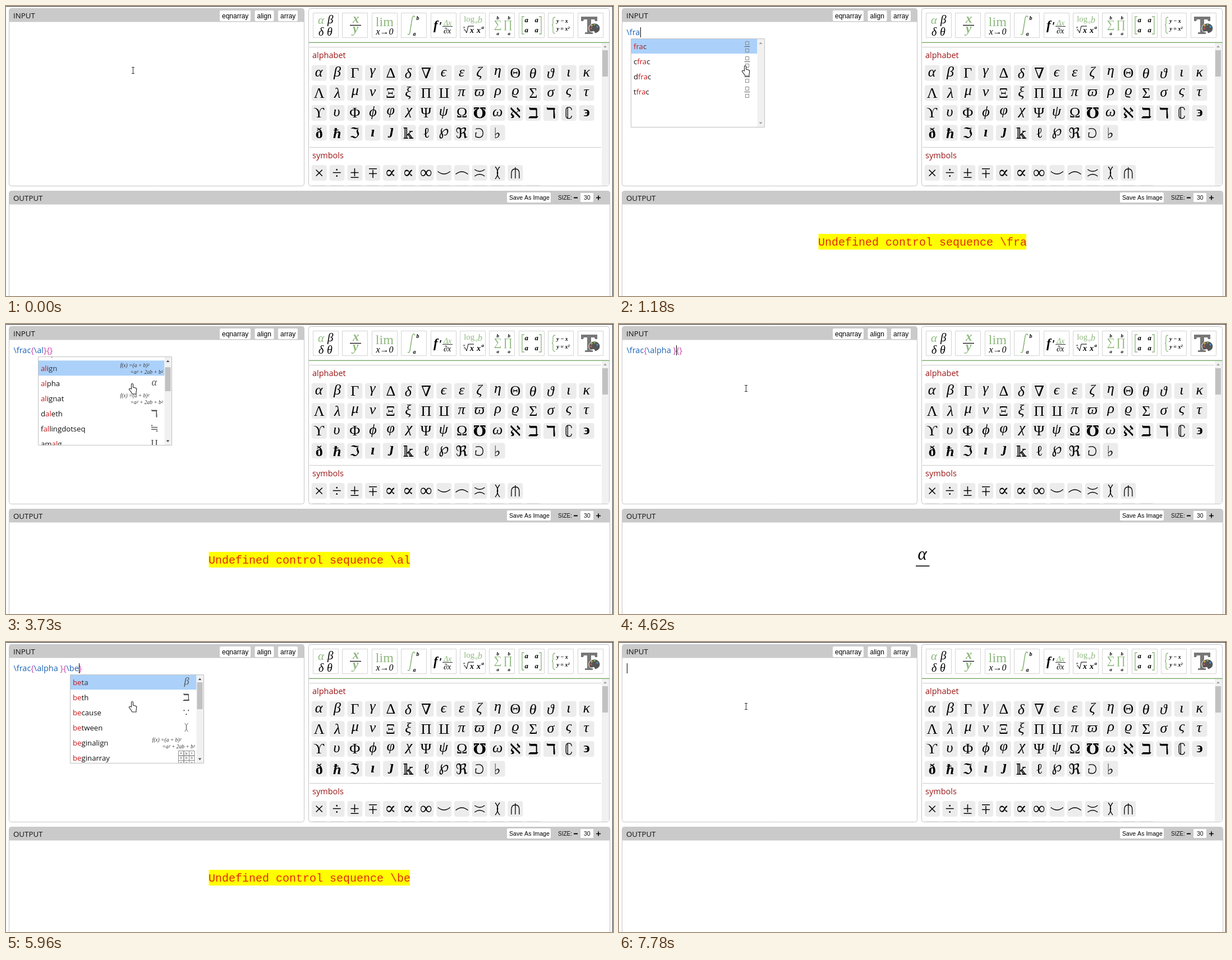
An HTML page with a canvas that plays this animation: 1082x518 px, repeating every 8 s.

```html
<!DOCTYPE html>
<html lang="en">
<head>
<meta charset="utf-8">
<title>Equation editor</title>
<style>
  html, body { margin: 0; width: 100%; height: 100%; overflow: hidden; background: #fff; }
  canvas { position: absolute; left: 0; top: 0; }
</style>
</head>
<body>
<canvas id="page" width="1082" height="518"></canvas>
<canvas id="live" width="1082" height="518"></canvas>
<script>
const LOOP = 8000;
const UI = '"Open Sans", sans-serif';
const ARIAL = '"Liberation Sans", Arial, sans-serif';
const MATH = '"Liberation Serif", "DejaVu Serif", "DejaVu Sans", serif';
const GREEN = '#8fb87f';
let g = document.getElementById('page').getContext('2d');

function box(x, y, w, h, fill, stroke, radius = 0) {
  g.beginPath();
  g.roundRect(x, y, w, h, radius);
  if (fill) { g.fillStyle = fill; g.fill(); }
  if (stroke) { g.strokeStyle = stroke; g.lineWidth = 1; g.stroke(); }
}
function path(d, stroke, width = 1, fill) {
  const p = new Path2D(d);
  if (fill) { g.fillStyle = fill; g.fill(p); }
  if (stroke) { g.strokeStyle = stroke; g.lineWidth = width; g.stroke(p); }
}
function text(s, x, y, font, color = '#111') {
  g.font = font;
  g.fillStyle = color;
  g.fillText(s, x, y);
  return x + g.measureText(s).width;
}

// Thin symbols drawn as strokes, and symbols that are another one upside down
const STROKES = {
  '⌣': 'M-11-2.5q11 9 22 0', '⌢': 'M-11 2.5q11-9 22 0',
  '≍': 'M-9-6q9 7 18 0M-9 6q9-7 18 0',
  '≬': 'M-4-11q9 11 0 22M4-11q-9 11 0 22',
  '⋔': 'M0-10v20M-7 10v-9q0-8 7-8t7 8v9',
  '⅁': 'M-5 0h-2v7q12 4 13-6 0-11-13-8',
  '∁': 'M5-5q0-5-5-5t-5 5v10q0 5 5 5t5-5M-2-9v18'
};
const FLIPPED = { '∐': 'Π', '∓': '±' };

// Math text with its ink centred on (x, y)
function glyph(s, x, y, size, color = '#000', style = '') {
  g.save();
  g.translate(x, y);
  if (FLIPPED[s]) g.rotate(Math.PI);
  if (STROKES[s]) {
    g.scale(size / 26, size / 26);
    path(STROKES[s], color, 1.3);
  } else {
    g.font = `${style} ${size}px ${MATH}`;
    g.fillStyle = color;
    const shown = FLIPPED[s] || s, m = g.measureText(shown);
    g.fillText(shown, (m.actualBoundingBoxLeft - m.actualBoundingBoxRight) / 2,
      (m.actualBoundingBoxAscent - m.actualBoundingBoxDescent) / 2);
  }
  g.restore();
}
const italic = (s, x, y, size, color) => glyph(s, x, y, size, color, 'italic');
const boldItalic = (s, x, y, size, color) => glyph(s, x, y, size, color, 'italic bold');
const styleOf = c => /[ıȷħ]/.test(c) ? 'italic bold' : /[α-ωϕϑϖϱϵ]/.test(c) ? 'italic'
  : /[℧ℶℸ϶ð]/.test(c) ? 'bold' : '';

function panel(x, y, w, h, title) {
  box(x + .5, y + .5, w, h, '#fff', '#c6c6c6', 4);
  if (!title) return;
  box(x + .5, y + .5, w, 24, '#cacaca', null, [4, 4, 0, 0]);
  text(title, 13, y + 17.5, `13.3px ${UI}`);
}
function button(label, x, y, w, h, size) {
  box(x, y, w, h, '#fff', null, 2);
  text(label, x + 4, y + h / 2 + size * .35, `${size}px ${ARIAL}`, '#000');
}
function symbolRow(symbols, y, size = 26) {
  [...symbols].forEach((c, i) => {
    const x = 558.3 + i * 31.78;
    box(x - 13.5, y - 14, 27, 28, '#ececec', null, 4);
    if (c !== ' ') glyph(c, x, y, STROKES[c] ? 26 : size, '#000', styleOf(c));
  });
}

function drawToolbar() {
  for (let i = 0; i < 10; i++) box(547.5 + Math.round(i * 52.4), 12.5, 45, 44, '#fff', '#d4d4d4');
  italic('α', 562, 27, 21, GREEN); italic('β', 578, 26, 21);
  italic('δ', 562, 45, 20); italic('θ', 577, 45, 20);
  boldItalic('x', 623, 24, 23, GREEN);
  path('M613 34.5h20', '#222', 1.5);
  boldItalic('y', 622, 45, 23, GREEN);
  glyph('lim', 675, 28, 24, GREEN);
  italic('x→0', 674.5, 45, 16);
  path('M729 20q-3-5-5 2l-4 25q-1 6-4 3', GREEN, 1.6);
  boldItalic('b', 734, 21, 10); boldItalic('a', 728, 50, 10);
  boldItalic('f', 767, 36, 23); glyph('′', 775, 31, 20, '#000', 'bold');
  italic('Δx', 787, 30, 14, GREEN); path('M778 36.5h18', '#333'); italic('∂x', 787, 43, 14);
  glyph('log', 826, 24, 15, GREEN); italic('a', 839, 29, 9, GREEN); italic('b', 845, 24, 16, GREEN);
  path('M816 43l2-1 3 6 3-12h10', '#000'); italic('n', 817, 38, 7);
  boldItalic('x', 830, 44, 14); boldItalic('x', 842, 44, 14); boldItalic('a', 850, 39, 9);
  glyph('∑', 876, 35, 20, GREEN); glyph('∏', 895, 35, 20, GREEN);
  for (const x of [877, 897]) {
    boldItalic('b', x, 21, 9);
    boldItalic('a', x, 50, 9);
  }
  path('M924 19h-4v31h4M950 19h4v31h-4', GREEN, 1.4);
  for (const x of [928, 946]) for (const y of [26, 44]) boldItalic('a', x, y, 13);
  path('M979 20q-4 0-4 4v6q0 4-2 4 2 0 2 4v7q0 4 4 4', GREEN, 1.3);
  boldItalic('y − x', 991, 28, 10); boldItalic('y = x²', 993, 41, 10);
  path('M1025 19h29v8h-4l-1-3h-6v23h3v3h-14v-3h4v-23h-6l-1 3h-4z', null, 0, '#777');
  path('M1039 41a10 9 0 1 1 14 7q-4 2-4-1t-4-1q-5 1-6-5z', '#fff', 1, '#555');
  [['#d8a23c', 1044, 35], ['#65b35d', 1049, 33], ['#4f90d0', 1054, 37], ['#c8584c', 1043, 40]]
    .forEach(([color, x, y]) => box(x - 1.7, y - 1.7, 3.4, 3.4, color, null, 2));
  box(540, 64.5, 535.5, 1.5, '#7fb070');
}

function drawPage() {
  box(0, 0, 1082, 518, '#fff');
  box(0, 0, 1082, 1, '#222');
  box(1081, 0, 1, 518, '#333');
  panel(5, 4, 526, 317, 'INPUT');
  button('eqnarray', 381, 8, 55, 19, 12);
  button('align', 443.5, 8, 34, 19, 12);
  button('array', 485, 8, 35, 19, 12);

  panel(539, 4, 536, 317);
  drawToolbar();
  path('M541 73.5h520M541 252.5h520', '#ccc');
  text('alphabet', 546, 93, `14.5px ${UI}`, '#9b1515');
  text('symbols', 546, 271.5, `14.5px ${UI}`, '#9b1515');
  ['αβΓγΔδ∇ϵεζηΘθϑικ', 'ΛλμνΞξΠ∐πϖρϱΣσςτ', 'ϒυΦϕφχΨψΩ℧ωℵℶℸ∁϶', 'ðħℑıȷ𝕜ℓ℘ℜ⅁♭']
    .forEach((row, i) => symbolRow(row, 119.5 + i * 35.7));
  symbolRow('×÷±∓∝∝∞⌣⌢≍≬⋔', 298, 30);
  g.save();
  g.beginPath(); g.rect(541, 310, 520, 11); g.clip();
  symbolRow(' '.repeat(13), 333.5);
  g.restore();
  box(1062, 66, 13, 255, '#f1f1f1');
  box(1063, 79, 10, 47, '#c1c1c1');
  path('M1065 74h6l-3-3.5z', null, 0, '#a0a0a0');

  panel(5, 330, 1071, 200, 'OUTPUT');
  button('Save As Image', 893, 333, 78, 18, 10.6);
  text('SIZE:', 984, 346, `10px ${ARIAL}`);
  box(1012, 341.5, 7, 2, '#000');
  box(1024, 334, 23, 16, '#fff');
  text('30', 1030, 346, `10.5px ${ARIAL}`);
  path('M1052 342.5h8M1056 338.5v8', '#000', 1.6);
}

// Suggestion lists by typed prefix: left edge, total rows, names
const FRAC = ['frac', 'cfrac', 'dfrac', 'tfrac'];
const AL = ['aleph', 'align', 'alpha', 'alignat', 'daleth', 'fallingdotseq', 'amalg', 'forall'];
const BE = ['beta', 'beth', 'because', 'between', 'beginalign', 'beginarray'];
const LISTS = {
  f: [21.5, 16, ['frac', 'flat', 'frown', 'forall', 'fallingdotseq', 'cfrac']],
  fr: [21.5, 5, ['frac', 'frown', ...FRAC.slice(1)]],
  fra: [21.5, 4, FRAC],
  a: [57.5, 30, AL], al: [57.5, 18, AL],
  b: [114.5, 24, BE], be: [114.5, 16, BE]
};
const ICONS = {
  aleph: 'ℵ', alpha: 'α', daleth: 'ℸ', fallingdotseq: '≒', amalg: '∐', forall: '∀',
  flat: '♭', frown: '⌢', beta: 'β', beth: 'ℶ', because: '∵', between: '≬'
};

function drawIcon(name, right, y) {
  const gray = '#555', x = right - 31;
  if (ICONS[name]) glyph(ICONS[name], x, y, 18, gray, styleOf(ICONS[name]));
  else if (name.endsWith('frac')) {
    const mid = Math.round(y) + .5;
    path(`M${x - 5} ${mid}h10`, gray);
    box(x - 3, mid - 9, 6, 6, null, '#888');
    box(x - 3, mid + 4, 6, 6, null, '#888');
  } else if (name.includes('align')) {
    const font = `italic 9.5px ${MATH}`;
    text('f(x) =(a + b)²', right - 92, y - 2, font, '#333');
    text('=a² + 2ab + b²', right - 74, y + 10, font, '#333');
  } else {
    for (let r = 0; r < 3; r++) for (let c = 0; c < 3; c++) {
      const cx = right - 45 + c * 9.5, cy = y - 12 + r * 8.5;
      box(cx, cy, 9.5, 8.5, null, '#888');
      glyph(r ? '0' : 'abc'[c], cx + 4.7, cy + 4.3, 7, '#333');
    }
  }
}

function drawPopup(query, selected, scroll) {
  const [x, rows, names] = LISTS[query], right = x + 238, bar = right - 13;
  const scrolls = rows > 5;
  g.save();
  box(x, 58.5, 238, 158, '#fff');
  g.beginPath(); g.rect(x, 58.5, 238, 158); g.clip();
  names.forEach((name, i) => {
    const y = 71.5 + i * 27 - scroll, at = name.indexOf(query), font = `13.2px ${UI}`;
    if (i === selected) box(x, y - 13.5, 225, 27, '#abd1fa');
    const ink = i === selected ? '#334' : '#111';
    let pen = text(name.slice(0, at), x + 4.5, y + 5, font, ink);
    pen = text(query, pen, y + 5, font, '#cf1515');
    text(name.slice(at + query.length), pen, y + 5, font, ink);
    drawIcon(name, right, y);
  });
  box(bar, 59, 13, 157, '#f1f1f1');
  const total = rows * 27, arrow = scrolls ? '#505050' : '#a3a3a3';
  if (scrolls) box(bar + 1, 72 + scroll * 131 / total, 10, 131 * 158 / total, '#c1c1c1');
  path(`M${bar + 3} 68h6l-3-3.5zM${bar + 3} 207.5h6l-3 3.5z`, null, 0, arrow);
  g.restore();
  box(x, 58.5, 238, 158, null, '#c0c0c0');
}

// Start time, source text with | as the caret, prefix being completed
const STEPS = [
  [0, ''],
  [360, String.raw`\|`],
  [560, String.raw`\f|`, 'f'],
  [780, String.raw`\fr|`, 'fr'],
  [1000, String.raw`\fra|`, 'fra'],
  [1500, String.raw`\frac{|}{}`],
  [2110, String.raw`\frac{}{}`],
  [2390, String.raw`\frac{\|}{}`],
  [2840, String.raw`\frac{\a|}{}`, 'a'],
  [3080, String.raw`\frac{\al|}{}`, 'al'],
  [3570, String.raw`\frac{\al}{}`, 'al'],
  [4090, String.raw`\frac{\alpha |}{}`],
  [4620, String.raw`\frac{\alpha }|{}`],
  [4780, String.raw`\frac{\alpha }{|}`],
  [5190, String.raw`\frac{\alpha }{\|}`],
  [5680, String.raw`\frac{\alpha }{\b|}`, 'b'],
  [5900, String.raw`\frac{\alpha }{\be|}`, 'be'],
  [6360, String.raw`\frac{\alpha }{\beta |}`],
  [7050, String.raw`\frac{\alpha }{\beta }`],
  [7780, '|']
];

function drawInput(source, selectAll) {
  const font = `14.5px ${UI}`, code = source.replace('|', ''), caret = source.indexOf('|');
  if (selectAll) box(13.5, 36.5, 144, 21, '#d7d4f0');
  let pen = 13.5;
  for (const part of code.match(/[{}]|[^{}]+/g) || [])
    pen = text(part, pen, 52, font, /[{}]/.test(part) ? '#cc3fa9' : '#1c63b7');
  if (caret < 0) return;
  g.font = font;
  box(Math.round(14 + g.measureText(code.slice(0, caret)).width), 38, 1, 18, '#000');
}

function drawOutput(code, query) {
  if (query) {
    const message = 'Undefined control sequence \\' + query, width = message.length * 12;
    box(541.5 - width / 2, 407, width - 1.5, 28, '#ff0');
    text(message, 541 - width / 2, 428, '20px "Liberation Mono", monospace', '#e02a0a');
  } else if (code.includes('\\}')) {
    text(`$$${code} $$`, 6, 404, `24px ${UI}`, '#000');
  } else if (code.includes('alpha')) {
    italic('α', 541, 413, 31);
    box(529, 431.5, 24.5, 1.6, '#000');
    if (code.includes('beta')) italic('β', 541, 452, 31);
  } else if (code.includes('frac')) {
    box(538, 418.5, 6, 1.6, '#000');
  }
}

function drawPointer(hand) {
  if (hand) path('M223.5 116V108a1.5 1.5 0 0 1 3 0V113l4 1q2.5 .7 2.3 3l-.8 5v3h-7l-1-2-4.5-6q-.3-2 1.5-1.8z',
    '#222', 1.1, '#fff');
  else path('M224 109.5h5M226.5 109.5v11M224 120.5h5', '#333');
}

function frame(now) {
  const t = now % LOOP;
  const [, source, query] = STEPS.findLast(step => step[0] <= t);
  const code = source.replace('|', '');
  g.clearRect(0, 0, 1082, 518);
  drawInput(source, t >= 7050 && t < 7780);
  drawOutput(code, query);
  if (query) {
    const moving = query === 'al' && t >= 3570;
    const selected = moving ? (t < 3790 ? 1 : 2) : 0;
    drawPopup(query, selected, moving ? Math.min(39, (t - 3570) * .122) : 0);
  }
  drawPointer(query);
  requestAnimationFrame(frame);
}

drawPage();
g = document.getElementById('live').getContext('2d');
requestAnimationFrame(frame);
</script>
</body>
</html>
```
